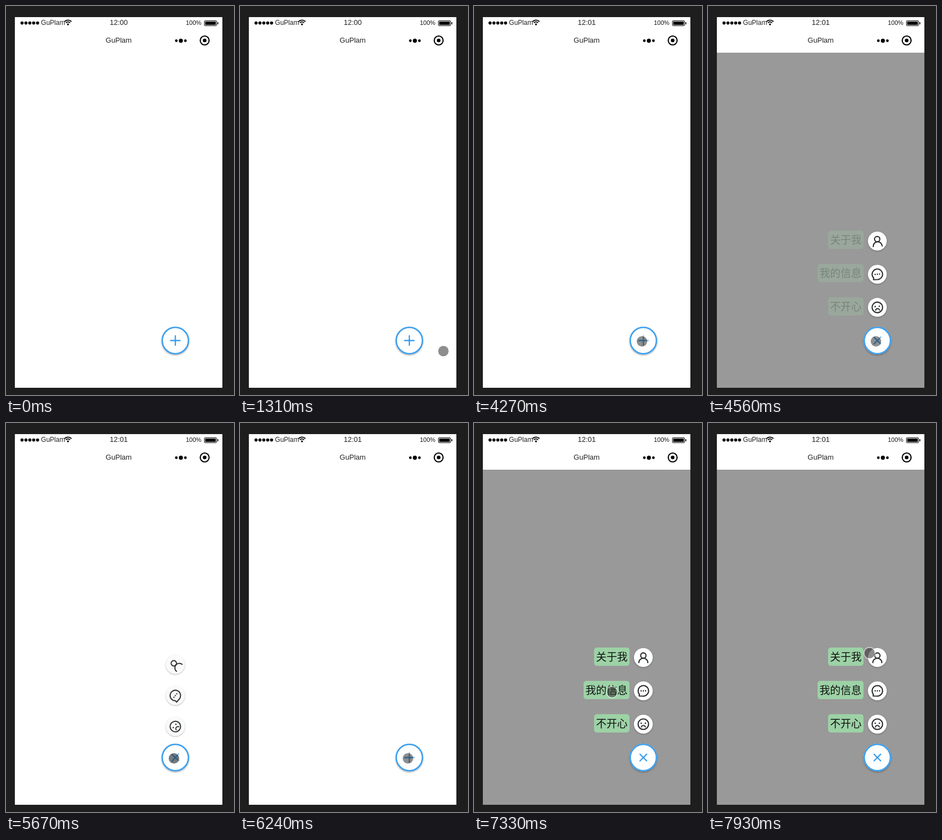
Write an HTML page with a canvas that moves like this. It is 412 px wide and 700 px high and loops after 8 s.

```html
<!DOCTYPE html>
<html lang="zh">
<head>
<meta charset="utf-8">
<title>Floating menu</title>
<style>
html, body { margin: 0; width: 100%; height: 100%; overflow: hidden; background: #1e1e1e; }
canvas { display: block; width: 412px; height: 700px; }
</style>
</head>
<body>
<canvas id="stage"></canvas>
<script>
const W = 412, H = 700, LOOP = 8000;
const BLUE = '#3a9ff0', INK = '#262a2c';
const SANS = '"Liberation Sans", Arial, sans-serif';
const CJK = '300 19px "Noto Sans CJK SC", "Noto Sans CJK", sans-serif';
const NAME = 'GuPlam';
const HUB = { x: 306, y: 602 };

const canvas = document.getElementById('stage');
const c = canvas.getContext('2d');
const dpr = window.devicePixelRatio || 1;
canvas.width = W * dpr;
canvas.height = H * dpr;

// Pointer path: time, x, y
const path = [
  [440, 359, 713], [700, 368, 680], [950, 369.5, 648], [1190, 367, 622],
  [1250, 367, 622], [1310, 367.5, 621], [1510, 367.5, 621],
  [1700, 373, 575], [1880, 352, 490], [2020, 322, 482], [2150, 310, 502],
  [2310, 336, 531], [2340, 337, 534], [2480, 337.5, 538.5], [2580, 337.5, 538.5],
  [2800, 320, 575], [3010, 304, 602.5], [3230, 304, 602.5], [3240, 303.5, 603.5],
  [6480, 303.5, 603.5], [6650, 273.5, 546], [6750, 273.5, 546],
  [6920, 259, 534], [7020, 259, 534], [7300, 250, 490], [7550, 250, 445],
  [7800, 254, 419], [7840, 254, 419], [7930, 292, 414], [8000, 292, 414]
];
const presses = [[4150, 4250], [5520, 5700], [6130, 6230]];

const items = [
  { y: 422, text: '关于我', left: 217, icon: person },
  { y: 482, text: '我的信息', left: 198, icon: bubble },
  { y: 542, text: '不开心', left: 217, icon: sad }
];

const ramp = (t, a, b) => Math.min(1, Math.max(0, (t - a) / (b - a)));
const ease = u => (1 - Math.cos(Math.PI * u)) / 2;

function spline(a, b, d, e, u) {
  return 0.5 * (2 * b + (d - a) * u + (2 * a - 5 * b + 4 * d - e) * u * u
    + (3 * b - a - 3 * d + e) * u * u * u);
}

function pointerAt(t) {
  if (t < path[0][0]) return null;
  let i = 0;
  while (i < path.length - 2 && t >= path[i + 1][0]) i++;
  const b = path[i], d = path[i + 1];
  if (b[1] === d[1] && b[2] === d[2]) return { x: b[1], y: b[2] };
  const a = path[Math.max(0, i - 1)], e = path[Math.min(path.length - 1, i + 2)];
  const u = ramp(t, b[0], d[0]);
  return { x: spline(a[1], b[1], d[1], e[1], u), y: spline(a[2], b[2], d[2], e[2], u) };
}

function menuAt(t) {
  if (t < 4290) return { open: 0, label: 0, shade: false };
  if (t < 5630) return { open: ease(ramp(t, 4290, 4575)), label: ramp(t, 4537, 4640), shade: true };
  if (t < 6270) return { open: 1 - ease(ramp(t, 5630, 5870)), label: 0, shade: false };
  return { open: ease(ramp(t, 6270, 6555)), label: ramp(t, 6517, 6620), shade: true };
}

function disc(x, y, r, color) {
  c.beginPath();
  c.arc(x, y, r, 0, Math.PI * 2);
  c.fillStyle = color;
  c.fill();
}

function ring(x, y, r, width, color) {
  c.beginPath();
  c.arc(x, y, r, 0, Math.PI * 2);
  c.lineWidth = width;
  c.strokeStyle = color;
  c.stroke();
}

function text(str, x, y, font, align, color) {
  c.font = font;
  c.textAlign = align;
  c.fillStyle = color;
  c.fillText(str, x, y);
}

function shadowed(blur, dy, alpha, draw) {
  c.save();
  c.shadowColor = `rgba(0,0,0,${alpha})`;
  c.shadowBlur = blur * dpr;
  c.shadowOffsetY = dy * dpr;
  draw();
  c.restore();
}

function person() {
  ring(0, -3.6, 4.8, 2.1, INK);
  c.beginPath();
  c.arc(0, 9.3, 8.1, Math.PI, 0);
  c.stroke();
}

function bubble() {
  c.beginPath();
  c.arc(0, 0, 9.5, Math.PI * 0.9, Math.PI * 2.5);
  c.lineTo(-7.6, 9.3);
  c.lineTo(-7.2, 6.2);
  c.closePath();
  c.lineWidth = 2.1;
  c.strokeStyle = INK;
  c.stroke();
  for (const x of [-4, 0, 4]) disc(x, 0, 1.2, INK);
}

function sad() {
  ring(0, 0, 9.5, 2.1, INK);
  disc(-3.8, -1.8, 1.3, INK);
  disc(3.8, -1.8, 1.3, INK);
  c.beginPath();
  c.arc(0, 6, 3.8, Math.PI * 1.08, Math.PI * 1.92);
  c.lineWidth = 1.9;
  c.stroke();
}

function statusBar(t) {
  for (let i = 0; i < 5; i++) disc(29 + i * 7, 30.6, 2.8, '#000');
  text(NAME, 63.3, 34, '12px ' + SANS, 'left', '#222');
  c.lineCap = 'butt';
  for (const r of [8.6, 5.3]) {
    c.beginPath();
    c.arc(112, 34, r, Math.PI * 1.24, Math.PI * 1.76);
    c.lineWidth = 1.8;
    c.strokeStyle = '#000';
    c.stroke();
  }
  disc(112, 33, 1.7, '#000');
  text(t < 3950 ? '12:00' : '12:01', 203.7, 34, '13px ' + SANS, 'center', '#222');
  text('100%', 325, 34, '11px ' + SANS, 'left', '#111');
  c.lineWidth = 1;
  c.strokeStyle = '#000';
  c.beginPath();
  c.roundRect(358.5, 26.5, 22, 9, 1.5);
  c.stroke();
  c.fillStyle = '#000';
  c.fillRect(360, 28, 19, 6);
  c.fillRect(382, 29, 1.5, 4);
}

function titleBar() {
  text(NAME, 203.6, 66, '13px ' + SANS, 'center', '#222');
  disc(307.8, 62.5, 2.4, '#000');
  disc(316, 62.5, 3.7, '#000');
  disc(324.2, 62.5, 2.4, '#000');
  ring(359, 62, 8, 2.1, '#000');
  disc(359, 62, 3.3, '#000');
}

function menuItem(item, m) {
  if (m.label > 0) {
    c.globalAlpha = m.label;
    c.fillStyle = '#9dd2a6';
    c.beginPath();
    c.roundRect(item.left, item.y - 18, 281 - item.left, 33, 5);
    c.fill();
    text(item.text, (item.left + 281) / 2, item.y + 6, CJK, 'center', '#111');
  }
  if (m.open > 0) {
    c.save();
    c.globalAlpha = m.open;
    c.translate(HUB.x, HUB.y + (item.y - HUB.y) * m.open);
    shadowed(3, 1, 0.3, () => disc(0, 0, 17, '#fff'));
    c.rotate((m.open - 1) * Math.PI * 4);
    c.lineCap = c.lineJoin = 'round';
    item.icon();
    c.restore();
  }
  c.globalAlpha = 1;
}

function hubButton(m) {
  c.save();
  c.translate(HUB.x, HUB.y);
  shadowed(3, 1.5, 0.35, () => disc(0, 0, 25, '#fff'));
  ring(0, 0, 23.7, 2.6, BLUE);
  c.rotate(m.open * Math.PI / 4);
  c.lineWidth = 2.3;
  c.lineCap = 'round';
  c.beginPath();
  c.moveTo(-8.5, 0);
  c.lineTo(8.5, 0);
  c.moveTo(0, -8.5);
  c.lineTo(0, 8.5);
  c.stroke();
  disc(0, 0, 2, BLUE);
  c.restore();
}

function pointer(t) {
  const p = pointerAt(t);
  if (!p) return;
  const down = presses.some(([a, b]) => t >= a && t < b);
  disc(p.x, p.y, 9.6, down ? 'rgba(45,55,60,.66)' : 'rgba(50,50,50,.55)');
  ring(p.x, p.y, 10.2, 1.5, 'rgba(255,255,255,.55)');
}

function draw(t) {
  c.setTransform(dpr, 0, 0, dpr, 0, 0);
  c.fillStyle = '#1e1e1e';
  c.fillRect(0, 0, W, H);
  c.fillStyle = '#fff';
  c.fillRect(16, 20, 375, 667);
  statusBar(t);
  titleBar();
  const m = menuAt(t);
  if (m.shade) {
    c.fillStyle = '#999';
    c.fillRect(16, 84, 375, 603);
  }
  for (const item of items) menuItem(item, m);
  hubButton(m);
  pointer(t);
}

const start = performance.now();
function tick() {
  draw((performance.now() - start) % LOOP);
  requestAnimationFrame(tick);
}
tick();
</script>
</body>
</html>
```
